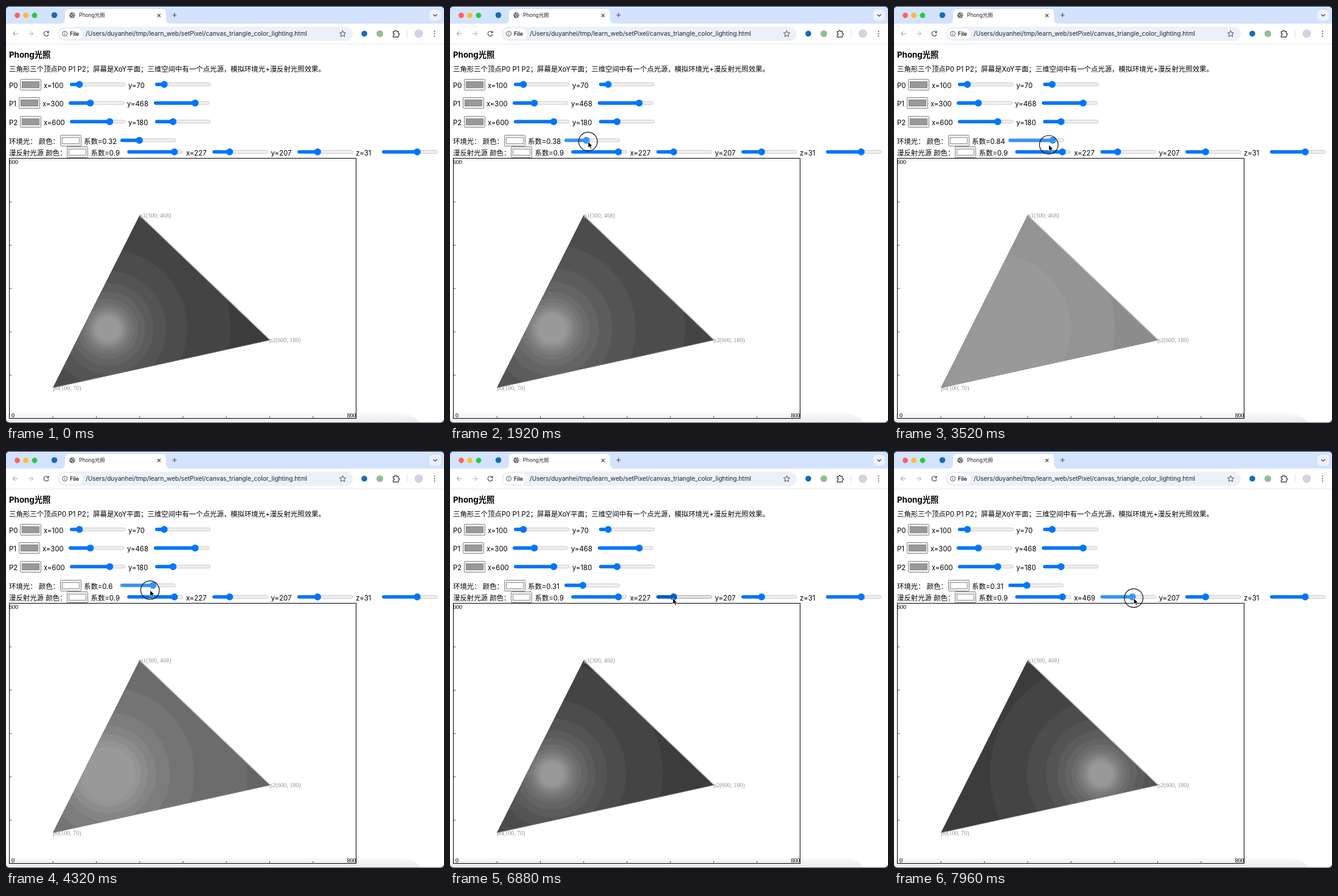
An HTML page for the animation above (8 s loop, 720 by 686 pixels).

```html
<!DOCTYPE html>
<html lang="zh-CN">
<head>
<meta charset="utf-8">
<title>Phong光照</title>
<style>
html, body { margin: 0; width: 100%; height: 100%; overflow: hidden; background: #fff; }
svg { display: block; width: 100vw; height: 100vh; }
text { font: 11.4px Inter, "Noto Sans CJK SC", "Noto Sans CJK", sans-serif; white-space: pre; }
.title { font-size: 8.5px; fill: #1f2328; }
.heading { font-size: 13.3px; font-weight: 700; }
.chip { font-size: 9px; font-weight: 500; }
.path { font-size: 10.1px; fill: #1f2328; }
.plot text { font: 10px "Liberation Serif", serif; }
.plot .label { fill: #929292; }
.icon { fill: none; stroke: #474b50; stroke-width: 1.2; }
</style>
</head>
<body>
<svg viewBox="0 0 720 686">
  <defs>
    <clipPath id="triangle"><path d="M77.3 628L219.7 344.6L433.5 549.7Z"/></clipPath>
    <linearGradient id="shade" x2="0" y2="1">
      <stop offset="0" stop-color="#ddd" stop-opacity=".15"/>
      <stop offset="1" stop-color="#ddd" stop-opacity=".6"/>
    </linearGradient>
  </defs>

  <rect width="720" height="686" fill="#173150"/>
  <rect y="1" width="720" height="684.3" rx="6" fill="#fff"/>
  <path d="M0 62V7Q0 1 6 1H714Q720 1 720 7V62Z" fill="#d3e3fd"/>
  <rect y="29" width="720" height="33" fill="#fff"/>
  <path d="M0 62.5H720" stroke="#e1e5ea"/>

  <circle cx="18.500" cy="15.500" r="4.400" fill="#ff5f57"/>
  <circle cx="32.500" cy="15.500" r="4.400" fill="#febc2e"/>
  <circle cx="47" cy="15.500" r="4.400" fill="#28c840"/>
  <circle cx="79.500" cy="15" r="4.800" fill="#1769bd"/>
  <path d="M90 29Q97 29 97 22V12Q97 5 104 5H256Q263 5 263 12V22Q263 29 270 29Z" fill="#fff"/>
  <circle cx="109" cy="15.300" r="4.700" fill="#5f6368"/>
  <path d="M105.500 14l3 1v2l1.500 2M109 11.500l1 2 3 .5M111 16l2 1" fill="none" stroke="#fff"/>
  <text class="title" x="120" y="18.200">Phong光照</text>
  <g class="icon">
    <path d="M249 13l5 5m0-5l-5 5M273.500 15h7m-3.500-3.500v7"/>
    <rect x="696" y="6" width="19" height="18" rx="6" fill="#edf3fe" stroke="none"/>
    <path d="M702.500 13.700l3 3 3-3" stroke-width="1.400"/>
    <path d="M19.500 45.500h-8m3.700-3.700l-3.700 3.700 3.700 3.700" stroke="#a6a9ad"/>
    <path d="M36.500 45.500h8m-3.700-3.700l3.700 3.700-3.700 3.700" stroke="#b9bcc0"/>
    <path d="M69.500 43.200a4 4 0 1 0 .6 3.300M70 41v2.800h-2.800"/>
  </g>
  <rect x="85" y="34" width="485" height="23.500" rx="11.700" fill="#ebf0f9"/>
  <rect x="88" y="37" width="38" height="17.500" rx="8.700" fill="#fff"/>
  <g class="icon">
    <circle cx="96.700" cy="45.500" r="4" stroke-width="1"/>
    <path d="M96.700 45v2.700m0-4.700v1" stroke-width="1"/>
    <path d="M553.500 40.500l1.500 3.400 3.700.3-2.800 2.500.8 3.600-3.200-1.900-3.200 1.900.8-3.600-2.800-2.500 3.700-.3z" stroke-width="1"/>
    <path d="M636.500 42h2.500q0-2 1.500-2t1.500 2h3v3q2 0 2 1.500t-2 1.500v3h-8.500v-3q2 0 2-1.500t-2-1.500z" stroke-width="1.300"/>
    <path d="M659.500 39v13" stroke="#d3e3fd"/>
  </g>
  <text class="chip" x="105" y="48.800">File</text>
  <text class="path" x="131" y="49">/Users/duyanhei/tmp/learn_web/setPixel/canvas_triangle_color_lighting.html</text>
  <circle cx="589" cy="45.500" r="4.800" fill="#1769bd"/>
  <circle cx="614.500" cy="45.500" r="5.500" fill="#90bd96"/>
  <circle cx="678.500" cy="45.500" r="7" fill="#d9d0e4"/>
  <path d="M704.500 41.500v.1m0 3.900v.1m0 3.900v.1" stroke="#474b50" stroke-width="2" stroke-linecap="round"/>

  <text class="heading" x="5" y="85">Phong光照</text>
  <text x="5" y="108">三角形三个顶点P0 P1 P2；屏幕是XoY平面；三维空间中有一个点光源，模拟环境光+漫反射光照效果。</text>
  <g id="controls"></g>

  <path d="M0 669.500H640Q672 669.500 680 685H6Q0 685 0 679Z" fill="url(#shade)"/>
  <g class="plot">
    <rect x="5.500" y="250.500" width="570" height="428" fill="none" stroke="#000"/>
    <path id="ticks" stroke="#555"/>
    <text x="5" y="259.500">600</text>
    <text x="9" y="676.500">0</text>
    <text x="560.500" y="676.500">800</text>
    <g id="surface" clip-path="url(#triangle)">
      <rect x="70" y="340" width="370" height="300" fill="#343434"/>
    </g>
    <path d="M220.500 344.800L434 549" stroke="#c6c6c6" stroke-width="1.600"/>
    <path d="M77.300 628L433.500 549.700" stroke="#999" stroke-width=".7"/>
    <text class="label" x="77" y="631.500">p0(100, 70)</text>
    <text class="label" x="219.700" y="348">p1(300, 468)</text>
    <text class="label" x="433" y="553">p2(600, 180)</text>
  </g>

  <g id="pointer">
    <circle id="ring" r="15.300" fill="none" stroke="#111" stroke-width="1.200"/>
    <path d="M0 0V10.200L2.400 8.100L4 11.800L5.900 11L4.300 7.400H7.400Z" fill="#000" stroke="#fff" stroke-width=".8"/>
  </g>
</svg>

<script>
const $ = id => document.getElementById(id);
const SCALE = 0.7125, LOOP = 8000;
const SHADE = 153, DIFFUSE = 0.9, LIGHT_Y = 207, LIGHT_Z = 31;

function add(parent, name, attrs, content = '') {
  const node = document.createElementNS('http://www.w3.org/2000/svg', name);
  for (const key in attrs) node.setAttribute(key, attrs[key]);
  node.textContent = content;
  return parent.appendChild(node);
}
const controls = $('controls');
const label = (x, y, s) => add(controls, 'text', { x, y }, s);

function swatch(x, y, fill) {
  add(controls, 'rect', { x: x + .5, y: y + .5, width: 34, height: 18, rx: 1, fill: '#efefef', stroke: '#858585' });
  add(controls, 'rect', { x: x + 3.5, y: y + 4.5, width: 28, height: 10, fill, stroke: '#777', 'stroke-width': .8 });
}

function slider(x, y, value) {
  const track = add(controls, 'rect', { x: x + .4, y: y - 2.5, width: 90.6, height: 5, rx: 2.5, 'stroke-width': .7 });
  const bar = add(controls, 'rect', { x, y: y - 2.8, height: 5.6, rx: 2.8 });
  const thumb = add(controls, 'circle', { cy: y, r: 5.7 });
  const self = {
    value,
    draw(px, py, held) {
      const cx = x + 5.7 + self.value * 79.8;
      const hover = !held && px > x && px < x + 91 && Math.abs(py - y) < 8;
      const base = held ? '#3793ff' : '#0075ff';
      track.setAttribute('fill', hover ? '#e2e2e2' : '#efefef');
      track.setAttribute('stroke', hover ? '#8c8c8c' : '#b8b8b8');
      bar.setAttribute('width', cx - x);
      bar.setAttribute('fill', hover ? '#005cc8' : base);
      thumb.setAttribute('cx', cx);
      thumb.setAttribute('fill', hover && Math.abs(px - cx) < 7 ? '#005cc8' : base);
    }
  };
  return self;
}

const sliders = [];
[[100, 70, 2], [300, 468, 0], [600, 180, 2]].forEach(([vx, vy, dx], i) => {
  const y = 129 + 30.6 * i;
  label(5, y + 5.7, 'P' + i);
  swatch(21 + dx, Math.round(y - 9.3), '#999');
  label(60 + dx, y + 5.7, 'x=' + vx);
  label(199 + dx, y + 5.7, 'y=' + vy);
  sliders.push(slider(103 + dx, y, vx / 800), slider(243 + dx, y, vy / 600));
});
label(5, 226.5, '环境光： 颜色：');
swatch(89, 212, '#fff');
const ambientText = label(128, 226.5, '');
const ambientSlider = slider(188, 221, 0);
label(5, 245.7, '漫反射光源 颜色：');
swatch(100, 231, '#fff');
label(139.5, 245.7, '系数=0.9');
const lightText = label(296, 245.7, '');
label(435.5, 245.7, 'y=207');
label(575, 245.7, 'z=31');
const lightSlider = slider(339.3, 240, 0);
sliders.push(ambientSlider, lightSlider, slider(199.3, 240, DIFFUSE),
  slider(479, 240, LIGHT_Y / 600), slider(618, 240, .655));

let ticks = '';
for (let i = 1; i < 8; i++) {
  const d = i * 100 * SCALE;
  ticks += `M${6 + d} 674.5v4`;
  if (i < 6) ticks += `M6 ${678.5 - d}h3.5`;
}
$('ticks').setAttribute('d', ticks);

// Shading is banded: each disc covers everything at least as bright as its level.
const discs = [];
for (let level = 56; level <= 152; level += 8) {
  const top = level === 152, grey = top ? SHADE : level + 4;
  const limit = top ? SHADE : level + (level > 100 && level < 132 ? 1 : 0);
  const node = add($('surface'), 'circle', { cy: 678.5 - LIGHT_Y * SCALE, fill: `rgb(${grey},${grey},${grey})` });
  discs.push({ node, limit });
}

function shade(ambient, lightX) {
  for (const { node, limit } of discs) {
    const cos = (limit / SHADE - ambient) / DIFFUSE;
    const r = cos <= 0.02 ? 1500 : cos >= 1 ? 0 : LIGHT_Z * Math.sqrt(1 / cos ** 2 - 1);
    node.setAttribute('r', r * SCALE);
    node.setAttribute('cx', 6 + lightX * SCALE);
  }
}

// Keys are [time, value, ...]; values run linearly between them.
function sample(keys, t) {
  const next = keys.findIndex(k => k[0] > t);
  if (next === 0) return keys[0].slice(1);
  if (next < 0) return keys[keys.length - 1].slice(1);
  const a = keys[next - 1], b = keys[next], f = (t - a[0]) / (b[0] - a[0]);
  return a.slice(1).map((v, i) => v + (b[i + 1] - v) * f);
}
const pointerKeys = [
  [520, 300, 690], [800, 252, 400], [1000, 226, 258], [1120, 221.5, 233], [1320, 219, 222],
  [1700, 220, 222], [2520, 245.7, 225.7], [3000, 265, 228], [3200, 264, 228], [3520, 254.5, 228.3],
  [4400, 235, 229], [5160, 220, 229], [5560, 218.5, 229], [5800, 235, 238], [6400, 335, 247],
  [6800, 366, 242], [7160, 367, 242], [7960, 394, 242]
];
const ambientKeys = [
  [1760, .32], [2520, .612], [3120, .89], [3280, .89], [3520, .842], [4500, .55], [5280, .342], [5480, .31]
];
const lightKeys = [[7220, 227], [7600, 335], [7960, 469]];

function frame(now) {
  const t = now % LOOP;
  const [px, py] = sample(pointerKeys, t);
  const ambient = Math.round(sample(ambientKeys, t)[0] * 100) / 100;
  const lightX = Math.round(sample(lightKeys, t)[0]);
  const dragAmbient = t >= 1480 && t < 5560, dragLight = t >= 7080;

  ambientSlider.value = ambient;
  lightSlider.value = lightX / 800;
  ambientText.textContent = '系数=' + ambient;
  lightText.textContent = 'x=' + lightX;
  const dragging = dragAmbient || dragLight;
  for (const s of sliders) {
    const held = s === ambientSlider && dragAmbient || s === lightSlider && dragLight;
    s.draw(dragging ? -99 : px, py, held);
  }
  shade(ambient, lightX);
  $('pointer').setAttribute('transform', `translate(${px} ${py})`);
  $('pointer').setAttribute('visibility', t < 520 ? 'hidden' : 'visible');
  $('ring').setAttribute('opacity', dragging ? 1 : 0);
  requestAnimationFrame(frame);
}
requestAnimationFrame(frame);
</script>
</body>
</html>
```
